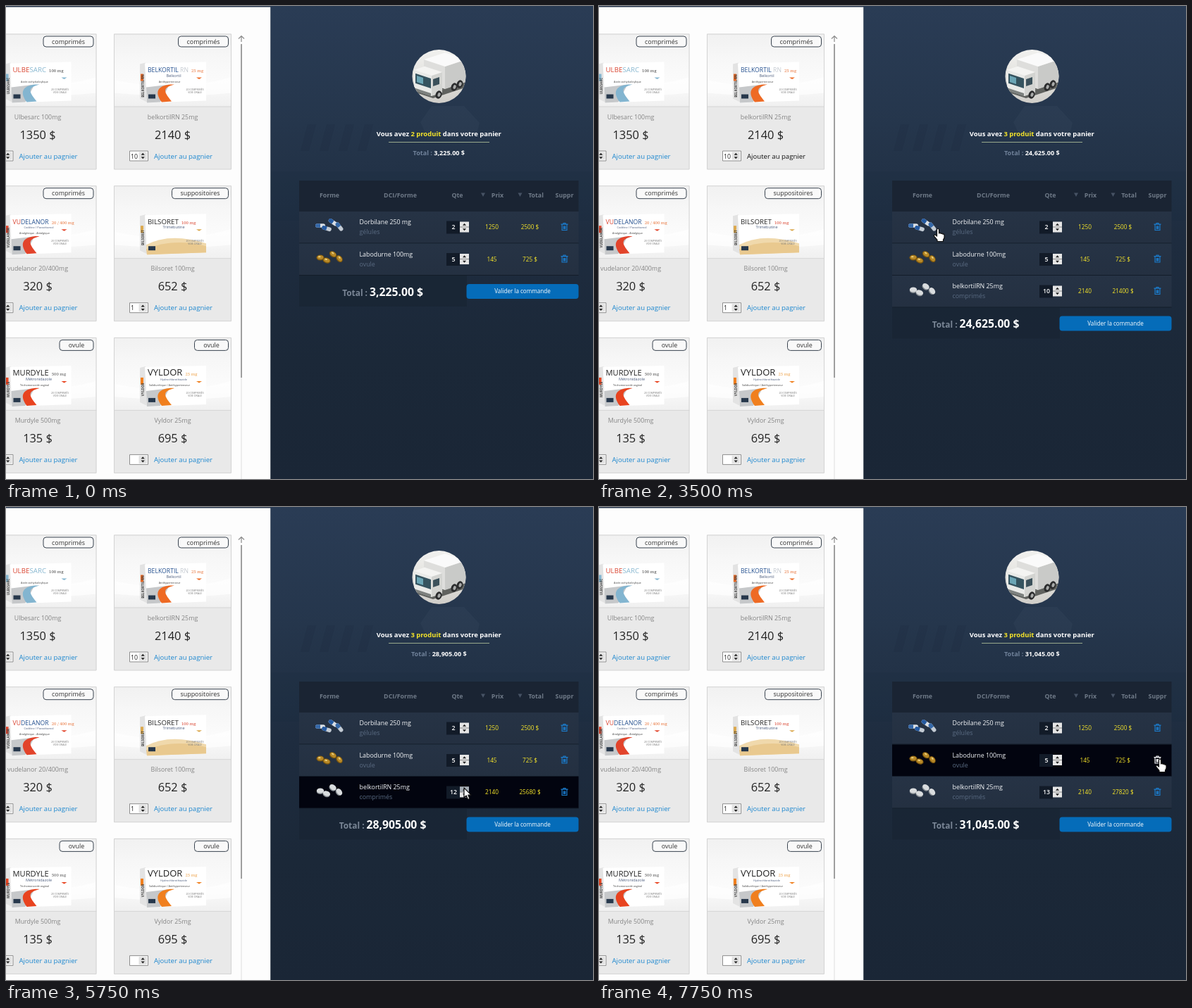
Recreate the animation shown at these times as an HTML page with a canvas. Size 833 px wide and 672 px high, loop 8000 ms.

```html
<!DOCTYPE html>
<html lang="fr">
<head>
<meta charset="utf-8">
<title>Panier</title>
<style>
html, body { margin: 0; width: 100%; height: 100%; overflow: hidden; background: #1b2838; }
canvas { display: block; }
</style>
</head>
<body>
<canvas id="stage" width="833" height="672"></canvas>
<script>
const c = document.getElementById('stage').getContext('2d');
const LOOP = 8000, STEP = 250;
const SANS = '"Open Sans", "Noto Sans", sans-serif';
const BLUE = '#1c87cf', YELLOW = '#f6e52a';

// ---------- helpers ----------
function rect(x, y, w, h, fill) { c.fillStyle = fill; c.fillRect(x, y, w, h); }

function shape(path, fill) { c.fillStyle = fill; c.fill(new Path2D(path)); }

function oval(x, y, rx, ry, turn, fill) {
  c.beginPath();
  c.ellipse(x, y, rx, ry, turn, 0, 7);
  c.fillStyle = fill;
  c.fill();
}

function rounded(x, y, w, h, r, fill, stroke) {
  c.beginPath();
  c.roundRect(x, y, w, h, r);
  if (fill) { c.fillStyle = fill; c.fill(); }
  if (stroke) { c.strokeStyle = stroke; c.lineWidth = 1; c.stroke(); }
}

// Draws with the origin moved to x, y.
function at(x, y, turn, paint) {
  c.save();
  c.translate(x, y);
  c.rotate(turn);
  paint();
  c.restore();
}

function triangle(x, y, half, height, fill) {
  shape(`M${x - half} ${y}h${2 * half}L${x} ${y + height}z`, fill);
}

function text(s, x, y, size, fill, align = 'center', weight = 400, family = SANS) {
  c.font = `${weight} ${size}px ${family}`;
  c.textAlign = align;
  c.fillStyle = fill;
  c.fillText(s, x, y);
  return c.measureText(s).width;
}

// Bold runs of [text, colour, size] on one line, centred at x.
function runs(parts, x, y) {
  const widths = parts.map(([s, , size]) => {
    c.font = `700 ${size}px ${SANS}`;
    return c.measureText(s).width;
  });
  x -= widths.reduce((a, b) => a + b) / 2;
  for (const [s, fill, size] of parts) x += text(s, x, y, size, fill, 'left', 700);
}

function gradient(y0, y1, ...colors) {
  const g = c.createLinearGradient(0, y0, 0, y1);
  colors.forEach((k, i) => g.addColorStop(i / (colors.length - 1), k));
  return g;
}

const money = n => n.toLocaleString('en-US') + '.00 $';

// ---------- shop ----------
const INK = '#222', RED = '#d9432f', NAVY = '#24508f', ORANGE = '#e8743a';
const products = [
  { name: 'Ulbesarc 100mg', price: 1350, tag: 'comprimés', road: '#83b5d0', dose: '100 mg', ink: '#444',
    title: [['ULBE', RED], ['SARC', '#86b6cf']], note: 'Acide acétylsalicylique' },
  { name: 'belkortilRN 25mg', price: 2140, tag: 'comprimés', qty: '10', road: '#ee6a24', dose: '25 mg', ink: ORANGE,
    title: [['BELKORTIL', NAVY], [' RN', '#c3c8cf']], sub: 'Belkortil', note: 'Antihypertenseur' },
  { name: 'vudelanor 20/400mg', price: 320, tag: 'comprimés', road: '#e2442b', dose: '20 / 400 mg', ink: ORANGE,
    title: [['VU', RED], ['DELANOR', NAVY]], sub: 'Codéine / Paracétamol', note: 'Analgésique - Antalgique' },
  { name: 'Bilsoret 100mg', price: 652, tag: 'suppositoires', qty: '1', dose: '100 mg', ink: RED,
    title: [['BILSORET', INK]], sub: 'Trimébutine' },
  { name: 'Murdyle 500mg', price: 135, tag: 'ovule', road: '#e8431f', dose: '500 mg', ink: '#555',
    title: [['MURDYLE', INK]], sub: 'Métronidazole', note: 'Trichomonacide vaginal' },
  { name: 'Vyldor 25mg', price: 695, tag: 'ovule', road: '#f07f1e', dose: '25 mg', ink: '#eda24a',
    title: [['VYLDOR', INK]], sub: 'Hydrochlorothiazide', note: 'Salidiurétique / Antihypertenseur' }
];

function arrows(x, y, gap) {
  triangle(x, y - gap, 2.6, -3, INK);
  triangle(x, y + gap, 2.6, 3, INK);
}

function pack(p) {
  const { road = '#dba94f', sub = '', note = '' } = p;
  const brand = p.title.map(run => run[0]).join('');
  const size = 78 / brand.split(' ')[0].length;

  shape('M37 43L45 41L47 97L37 92z', '#e3e3e3');
  rect(38, 57, 4, 10, road);
  at(43, 74, -Math.PI / 2, () => text(brand, 0, 0, 4.6, '#444', 'center', 700));
  shape('M44 42L131 40V95L47 98z', '#fff');
  if (p.road) {
    shape('M46 76L79 72L66 97L47 98z', '#c6c8ca');
    shape('M86 72C66 71 55 80 68 97L82 96C73 84 66 77 86 72z', road);
  } else {
    shape('M46 84Q80 66 131 82V95L47 98z', '#f0d9ac');
    shape('M46 90Q85 74 131 86V95L47 98z', '#e9c98f');
  }
  rect(49, 86, 10, 6, '#27384c');
  let x = 48;
  for (const [s, fill] of p.title) x += text(s, x, 54.5, size, fill, 'left');
  text(p.dose, x + 4, 54.5, 6, p.ink, 'left', 400, '"Noto Serif", serif');
  text(sub, 85, 61, sub.length > 16 ? 4 : 5.5, '#4b5c7d');
  text(note, 79, 69, 3.6, '#666', 'center', 600);
  triangle(121, 62, 4, 2.5, road);
  text('20 COMPRIMÉS', 115, 80, 3.5, '#777');
  text('VOIE ORALE', 115, 84, 3.5, '#777');
}

function card(p, link) {
  rect(0, 0, 167, 192.5, '#e9e9e9');
  rect(0, 0, 167, 103.5, gradient(0, 103, '#f1f1f1', '#f7f7f7', '#fbfbfb', '#f0f0f0'));
  shape('M1 66Q90 84 166 62V84Q90 92 1 84z', 'rgba(255,255,255,.7)');
  pack(p);
  rect(0, 103, 167, 1, '#d6d6d6');
  rounded(0.5, 0.5, 166, 192, 0, null, '#d3d3d3');

  const half = { ovule: 24, suppositoires: 40 }[p.tag] || 35.5;
  rounded(162.5 - 2 * half, 3.5, 2 * half, 15, 4, '#f9f9f9', '#39434f');
  text(p.tag, 162.5 - half, 14, 8.95, '#333');

  text(p.name, 83.5, 121, 8.9, '#858585');
  text(p.price + ' $', 83.5, 149, 16.4, INK);
  rounded(22.5, 166.5, 26, 14, 0, '#fff', '#8d8d8d');
  rect(35.5, 168, 11.5, 11, '#e2e2e2');
  arrows(41.2, 173.5, 1.2);
  text(p.qty || '', 24, 177, 8.8, INK, 'left');
  text('Ajouter au pagnier', 57, 177, 9.58, link, 'left');
}

function shop(t) {
  rect(0, 0, 375.5, 672, '#fdfdfd');
  rect(0, 0, 376, 1.5, '#26344a');
  const clicked = t >= 1750 && t < 3750 ? '#111' : t === 1500 ? '#0c66a3' : BLUE;
  products.forEach((p, i) => {
    at(i % 2 ? 153 : -38.5, 39.5 + 215.7 * (i >> 1), 0, () => card(p, i === 1 ? clicked : BLUE));
  });
  rect(333.5, 55, 1, 617, '#dedede');
  rect(333.3, 54, 1.5, 474, '#858585');
  c.strokeStyle = '#8b8b8b';
  c.lineWidth = 1.2;
  c.stroke(new Path2D('M330 46.5L334 42.5L338 46.5M334 43V51'));
}

// ---------- cart ----------
function backdrop() {
  rect(375.5, 0, 457.5, 672, gradient(0, 672, '#2a3c55', '#25364c', '#1e2c3f', '#1b2838', '#1a2636'));
  for (let i = 0; i < 4; i++) shape(`M${418 + i * 27} 206l10 -38h12l-10 38z`, 'rgba(10,20,34,.08)');
  shape('M588 165L604 142H650L672 166L668 182H596z', 'rgba(130,160,180,.05)');
  rect(376, 235, 457, 70, 'rgba(15,25,40,.05)');
}

// Isometric block standing on its nearest bottom corner.
function block(x, y, left, right, high, tones) {
  const dl = left * 0.33, dr = right * 0.33;
  shape(`M${x} ${y}v${-high}l${-left} ${-dl}v${high}z`, tones[0]);
  shape(`M${x} ${y}v${-high}l${right} ${-dr}v${high}z`, tones[1]);
  shape(`M${x} ${y - high}l${-left} ${-dl}l${right} ${-dr}l${left} ${dl}z`, tones[2]);
}

function truck() {
  c.save();
  c.beginPath();
  c.arc(614.5, 100, 38, 0, 7);
  c.clip();
  rect(576, 61, 78, 78, gradient(62, 138, '#f1f1ef', '#e3e2de', '#d0cec9'));
  block(606, 131, 26, 47, 8, ['#60625f', '#60625f', '#60625f']);
  block(623, 118, 30, 30, 32, ['#dededc', '#c9cac8', '#fafafa']);
  block(604, 128, 25, 15, 29, ['#e9eae8', '#d3d4d1', '#f4f4f2']);
  block(603, 117, 22, 0, 14, ['#35535f']);
  block(592, 111, 9, 0, 9, ['#6ba5b5']);
  block(606, 114, 0, 9, 10, ['', '#3c515b']);
  block(603, 128, 23, 0, 4, ['#7d817f']);
  for (const x of [614, 636, 644]) {
    const y = 126 - (x - 614) * 0.5;
    oval(x, y, 4.4, 5.8, 0.3, '#2b2c2d');
    oval(x + 0.6, y, 2, 3, 0.3, '#a9abaa');
  }
  c.restore();
}

const pieces = {
  'gélules'(k) {
    rounded(-7, -2.8, 14, 5.6, 2.8, k % 2 ? '#c3cbd4' : '#d9dfe6');
    rounded(-7, -2.8, 7, 5.6, [2.8, 0, 0, 2.8], k % 3 ? '#2459a0' : '#3568a8');
  },
  'ovule'() {
    oval(0, 0, 5.6, 4, 0, '#7d580f');
    oval(0, -0.4, 4.4, 2.9, 0, '#b98a28');
    oval(-1.2, -1.3, 1.8, 1, 0, '#ecd283');
  },
  'comprimés'() {
    oval(0, 1.4, 5.2, 3.7, 0, '#858b91');
    oval(0, 0, 5.2, 3.5, 0, '#d9dcde');
  }
};

function pills(form, y) {
  for (let k = 0; k < 4; k++) {
    at(446 + 9 * k, y + 5 * Math.sin(2.2 * k), 0.3 * k, () => pieces[form](k));
  }
}

const lines = [
  { name: 'Dorbilane 250 mg', form: 'gélules', price: 1250 },
  { name: 'Labodurne 100mg', form: 'ovule', price: 145 },
  { name: 'belkortilRN 25mg', form: 'comprimés', price: 2140 }
];

function trash(x, y, color) {
  at(x, y, 0, () => {
    c.strokeStyle = color;
    c.lineWidth = 1.1;
    c.stroke(new Path2D('M-3.5 -3V5H3.5V-3M-5 -3.4H5M-1.5 -3.4V-5H1.5V-3.4M-1.4 -1V3.5M0 -1V3.5M1.4 -1V3.5'));
  });
}

function cartLine(l, y, qty, hover, pressed, hotTrash) {
  rect(416, y, 396.5, 45, hover ? '#02040f' : gradient(y, y + 45, '#263345', '#243041'));
  rect(416, y + 44.5, 396.5, 1, '#131c29');
  pills(l.form, y + 20);
  text(l.name, 501.5, y + 18, 8.85, '#f4f6f8', 'left');
  text(l.form, 501.5, y + 32, 8.9, '#5a6b82', 'left');
  rect(625, y + 13.5, 19, 18, '#121b28');
  rect(644, y + 14.5, 13, 15, '#e6e6e6');
  if (pressed) rect(644, y + 14.5, 13, 7.5, '#a5adb5');
  rect(644, y + 21.5, 13, 1, '#888');
  arrows(650.5, y + 22, 2.3);
  text(qty, 635, y + 25, 8.8, '#fff', 'center', 600);
  text(l.price, 689.5, y + 25, 8.3, YELLOW);
  text(l.price * qty + ' $', 743.5, y + 25, 8.2, YELLOW);
  trash(792.5, y + 21.5, hotTrash ? '#fff' : '#1b7ed0');
}

const ROWS = 292, PITCH = 45.5;
const clicks = [4750, 5750, 6000];

function cart(t) {
  const count = t < 2750 ? 2 : 3;
  const added = 10 + clicks.filter(k => k <= t).length;
  const qtys = [2, 5, added].slice(0, count);
  const total = qtys.reduce((sum, q, i) => sum + q * lines[i].price, 0);
  // hover styles trail the pointer a little
  const [px, py] = pointerAt(t - 100);
  const hover = px > 416 ? Math.floor((py - ROWS) / PITCH) : -1;

  backdrop();
  truck();
  runs([['Vous avez ', '#fff', 9.45], [count + ' produit', YELLOW, 9.45], [' dans votre panier', '#fff', 9.45]], 614.3, 184.5);
  rect(543, 193, 143, 1, '#98a98c');
  runs([['Total : ', '#70829a', 9.07], [money(total), '#fff', 9.07]], 614.3, 212);

  rect(416, 248, 396.5, 44, '#1a2433');
  const heads = { 'Forme': 459, 'DCI/Forme': 559.5, 'Qte': 640.5, 'Prix': 697.5, 'Total': 752, 'Suppr': 792.5 };
  for (const h in heads) text(h, heads[h], 271.5, 8.8, '#6f7a88', 'center', 700);
  for (const x of [677, 729.5]) triangle(x, 265.5, 3, 5.5, '#465264');

  qtys.forEach((q, i) => {
    const over = hover === i;
    cartLine(lines[i], ROWS + PITCH * i, q, over, over && clicks.includes(t), over && px > 785);
  });

  const y = ROWS + PITCH * count;
  rect(416, y, 238, 44, 'rgba(25,36,51,.75)');
  runs([['Total : ', '#7a8696', 11.9], [money(total), '#fff', 15.7]], 534.5, y + 28.5);
  rounded(653.5, y + 12, 159, 21, 4, '#056cb9');
  text('Valider la commande', 733, y + 25, 8.1, '#fff');
}

// ---------- pointer ----------
// Key points: time, x, y
const stops = [
  [250, 30, 636], [1250, 230, 210], [1500, 230, 210], [2250, 294, 211], [3250, 294, 211],
  [3500, 481, 316], [4250, 649, 407], [4500, 650, 399], [6250, 650, 399], [7000, 679, 418],
  [7500, 796, 358], [LOOP, 796, 358]
];

function pointerAt(t) {
  const k = stops.findIndex(s => s[0] > t);
  if (k < 1) return [-50, 0];
  const [t0, x0, y0] = stops[k - 1], [t1, x1, y1] = stops[k];
  const f = (t - t0) / (t1 - t0);
  return [x0 + (x1 - x0) * f, y0 + (y1 - y0) * f];
}

const ARROW = 'M0 0V14L3.2 11L5.6 16.5L8 15.4L5.7 10.2H10Z';
const HAND = 'M-1.5 1.5Q0-1 1.5 1.5V7Q3.5 5.5 4.3 7.5Q6.2 6.3 7 8.3Q9 7.5 9 10V13Q8.5 15 7.5 16V18.5H-1V16.5L-5.5 11Q-6 8.5-3.5 9.3L-1.5 11Z';

function pointer(t) {
  const [x, y] = pointerAt(t);
  const outline = new Path2D(Math.abs(x - 640) < 35 ? ARROW : HAND);
  at(x, y, 0, () => {
    c.lineJoin = 'round';
    c.lineWidth = 1.2;
    c.fillStyle = '#fff';
    c.strokeStyle = '#111';
    c.fill(outline);
    c.stroke(outline);
  });
}

function draw(now) {
  const t = Math.floor(now % LOOP / STEP) * STEP;
  c.clearRect(0, 0, 833, 672);
  shop(t);
  cart(t);
  pointer(t);
}

const start = performance.now();
function tick() {
  draw(performance.now() - start);
  requestAnimationFrame(tick);
}
tick();
</script>
</body>
</html>
```
